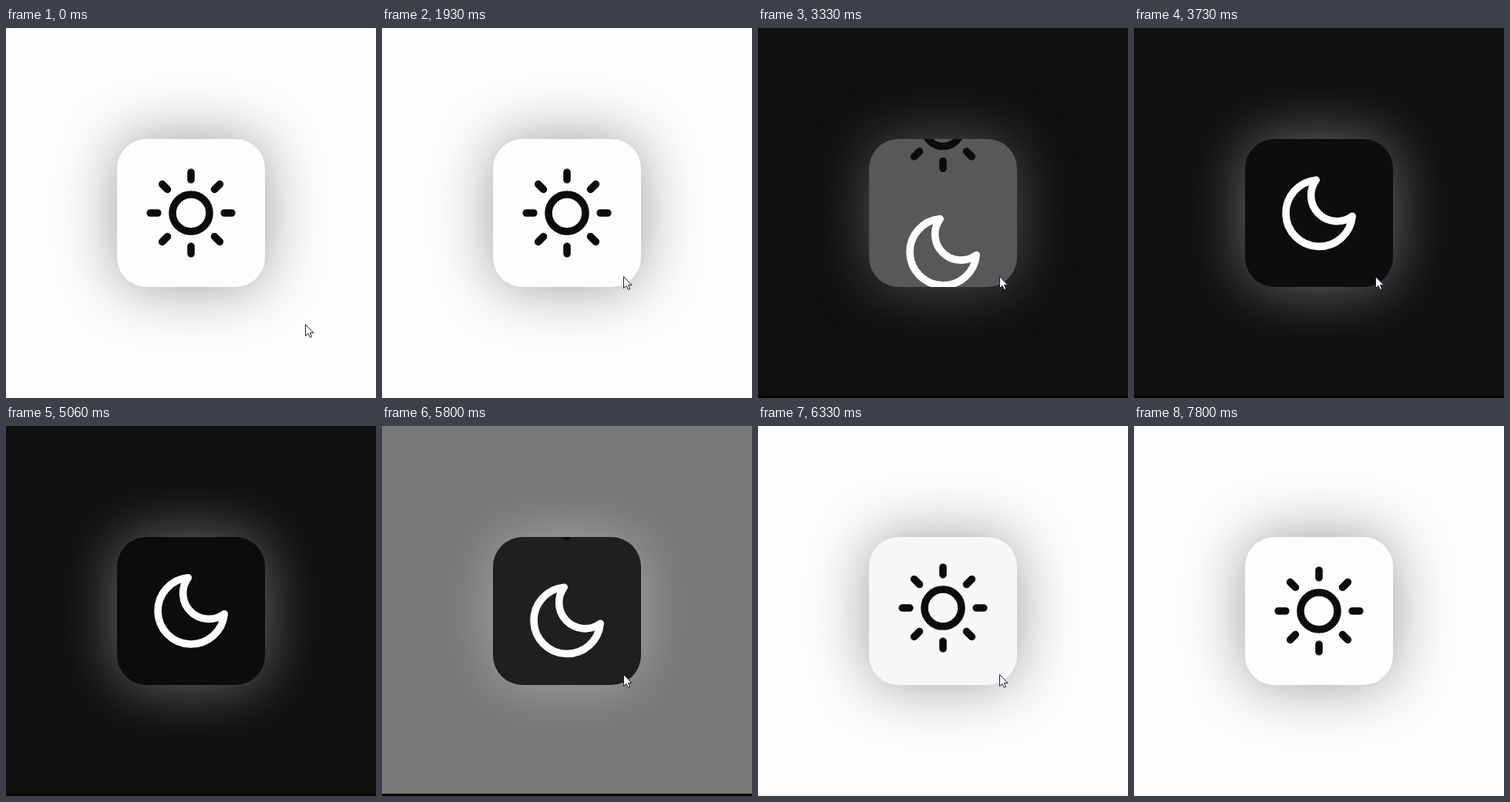
An HTML page that plays this animation: 480 px wide and 480 px high, repeating every 8200 ms.

```html
<!DOCTYPE html>
<html lang="en">
<head>
<meta charset="utf-8">
<title>Theme toggle</title>
<style>
  html, body { margin: 0; width: 100%; height: 100%; overflow: hidden; }
  #stage { position: relative; width: 480px; height: 480px; overflow: hidden; }
  #card {
    position: absolute; left: 144px; top: 144px; width: 192px; height: 192px;
    border-radius: 38.4px; overflow: hidden;
  }
  #edge { position: absolute; left: 0; top: 477px; width: 480px; height: 3px; background: #070004; }
  svg { position: absolute; left: 0; top: 0; display: block; }
  .icon { fill: none; stroke-width: 2; stroke-linecap: round; stroke-linejoin: round; }
</style>
</head>
<body>
<div id="stage">
  <div id="edge"></div>
  <div id="card">
    <svg width="192" height="192" viewBox="-20 -20 40 40">
      <g id="sun" class="icon" stroke="#0c0c0c">
        <circle r="5"/>
        <path d="M0-11v2M0 9v2M-11 0h2M9 0h2M-7.78-7.78l1.42 1.42M6.36 6.36l1.42 1.42M-7.78 7.78l1.42-1.42M6.36-6.36l1.42-1.42"/>
      </g>
      <g id="moon" class="icon" stroke="#fdfdfd">
        <path d="M9 .79A9 9 0 1 1-.79-9 7 7 0 0 0 9 .79z"/>
      </g>
    </svg>
  </div>
  <svg width="480" height="480" viewBox="0 0 480 480">
    <path id="cursor" d="M.5.5V15.6L4 12.3 6.4 17.4 8.7 16.3 6.4 11.4H11z"
      fill="#fdfdfd" stroke="#1c1b45" stroke-width="1" stroke-linejoin="round"/>
  </svg>
</div>
<script>
const LOOP = 8200, STEP = 200 / 3;
const SLIDE = 33.6;                 // distance between the icons, in icon units
const SLOW = 750, FAST = 250;       // card and page transitions
const [stage, edge, card, sun, moon, cursor] =
  ['stage', 'edge', 'card', 'sun', 'moon', 'cursor'].map(id => document.getElementById(id));

const clamp = x => Math.max(0, Math.min(1, x));
const mix = (a, b, p) => a + (b - a) * p;
const smooth = x => x * x * (3 - 2 * x);
const gray = (a, b, p, alpha = 1) => {
  const v = mix(a, b, p).toFixed(1);
  return `rgba(${v},${v},${v},${alpha})`;
};

// CSS "ease": cubic-bezier(.25, .1, .25, 1)
function ease(x) {
  if (x <= 0 || x >= 1) return clamp(x);
  let lo = 0, hi = 1, s = 0.5;
  for (let i = 0; i < 24; i++) {
    s = (lo + hi) / 2;
    if (0.75 * s * (1 - s) + s ** 3 < x) lo = s; else hi = s;
  }
  return 0.3 * s * (1 - s) ** 2 + 3 * s * s * (1 - s) + s ** 3;
}

// 0 = light, 1 = dark
function darkness(t, duration) {
  if (t < 3100) return 0;
  if (t < 5733) return ease((t - 3032) / duration);
  return 1 - ease((t - 5734) / duration);
}

function render(ms) {
  // the motion runs at 15 steps per second
  const t = Math.floor((ms % LOOP + 7) / STEP) * STEP;
  const page = darkness(t, FAST), p = darkness(t, SLOW);

  stage.style.background = gray(253, 16, page);
  edge.style.opacity = clamp(p * 1.4);
  card.style.background = gray(253, 12, p);
  card.style.boxShadow = `0 0 76.8px ${gray(12, 253, p, 0.4)}`;
  sun.setAttribute('transform', `translate(0 ${-SLIDE * p})`);
  moon.setAttribute('transform', `translate(0 ${SLIDE * (1 - p)})`);

  const shown = t < 130 || (t > 1530 && t < 5060) || (t > 5660 && t < 7799);
  const move = smooth(clamp((t - 1490) / 443));
  cursor.setAttribute('visibility', shown ? 'visible' : 'hidden');
  cursor.setAttribute('transform', `translate(${mix(388, 313, move)} ${mix(384, 322, move)})`);
}

const start = performance.now();
function tick() {
  render(performance.now() - start);
  requestAnimationFrame(tick);
}
tick();
</script>
</body>
</html>
```
